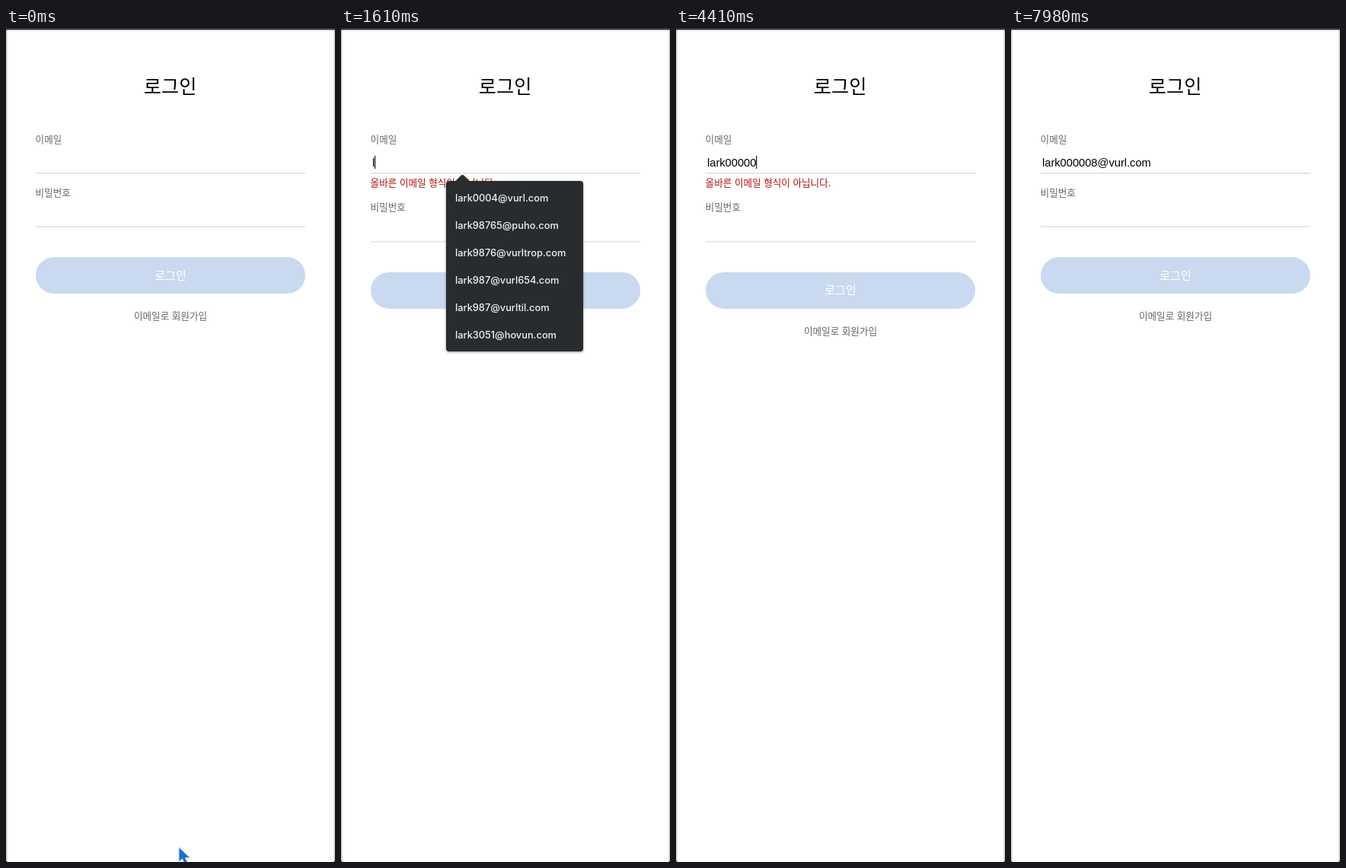
Recreate the animation shown at these times as an HTML page. Size 432x1096 px, loop 8000 ms.

```html
<!DOCTYPE html>
<html lang="ko">
<head>
<meta charset="utf-8">
<title>로그인</title>
<style>
  html, body { margin: 0; width: 100%; height: 100%; overflow: hidden; background: #fff; }
  svg { display: block; width: 432px; height: 1096px; }
  text { font: 500 12.6px "Noto Sans CJK KR", "Noto Sans KR", "Noto Sans CJK", sans-serif; fill: #666; white-space: pre; }
  .mid { text-anchor: middle; }
  #title { font-size: 25.2px; fill: #000; }
  #submit { font-size: 15px; fill: #fff; }
  #error { fill: #b01010; font-weight: 400; }
  #email { font: 14.667px "Liberation Sans", Arial, sans-serif; fill: #000; }
  #popup { fill: #282c2f; filter: drop-shadow(0 1px 1.5px rgba(0, 0, 0, .45)); }
  #popup text { font: 500 12.8px Inter, Roboto, sans-serif; fill: #f1f3f4; }
  .line { fill: #dadada; }
</style>
</head>
<body>
<svg viewBox="0 0 432 1096">
  <rect width="432" height="1096" fill="#fff"/>
  <path d="M.75 0V1096M431.25 0V1096" stroke="#c4c4c4" stroke-width="1.5"/>
  <rect width="432" height="2.5" fill="#353336"/>
  <path d="M0 1094v2h2zM432 1094v2h-2z" fill="#444"/>

  <text id="title" class="mid" x="215.6" y="86.2">로그인</text>
  <text x="38.6" y="151.2">이메일</text>
  <rect class="line" x="39" y="190.2" width="354" height="1.3"/>
  <text id="email" x="41" y="181.6"></text>
  <text id="error" x="38.6" y="208.2">올바른 이메일 형식이 아닙니다.</text>

  <g id="lower">
    <text x="38.6" y="220.7">비밀번호</text>
    <rect class="line" x="39" y="260.4" width="354" height="1.2"/>
    <rect x="39" y="301.1" width="354" height="48" rx="24" fill="#c9d9ef"/>
    <text id="submit" class="mid" x="216" y="330.6">로그인</text>
    <text class="mid" x="216" y="383.2">이메일로 회원가입</text>
  </g>

  <rect id="caret" width="1.1" height="17" fill="#000"/>

  <g id="popup">
    <path d="M149.5 202L157.5 194Q159.5 192 161.5 194L169.5 202Z"/>
    <rect id="panel" x="138" y="201" rx="4"/>
    <g id="rows"></g>
  </g>

  <g id="arrow">
    <path d="M0 0V17.5L4.2 13.8 7.2 20.5 10.3 19.1 7.4 12.6H13Z" fill="#1a6fd0" stroke="#dfe6ee" stroke-width="3.2" stroke-linejoin="round" paint-order="stroke"/>
  </g>
  <g id="beam" fill="none" stroke-linecap="round">
    <path id="stem" d="M-4-10Q-1-10 0-8Q1-10 4-10M0-8V8M-4 10Q-1 10 0 8Q1 10 4 10M-1.5 1H1.5" stroke="#b5daf7" stroke-width="4.4"/>
    <use href="#stem" style="display:none"/>
    <path d="M-4-10Q-1-10 0-8Q1-10 4-10M0-8V8M-4 10Q-1 10 0 8Q1 10 4 10M-1.5 1H1.5" stroke="#234a70" stroke-width="1.5"/>
  </g>
</svg>
<script>
const $ = id => document.getElementById(id);
const LOOP = 8000;
const ADDRESS = 'lark000008@vurl.com';
const HINTS = ['lark0004@vurl.com', 'lark98765@puho.com', 'lark9876@vurltrop.com',
  'lark987@vurl654.com', 'lark987@vurltil.com', 'lark3051@hovun.com'];

// One key press per character of the address
const KEYS = [1610, 2030, 2240, 2520, 2800, 3010, 3290, 3990, 4410, 4550,
  5040, 5950, 6090, 6230, 6440, 6720, 6790, 7000, 7140];
const FOCUS = 1120, TAB = 7420;
const BLINKS = [[3780, 3990], [5600, 5950], [7980, LOOP]];
const ERROR = [1610, 6790];
const POPUP = [1540, 3990], NARROW = 2800;
const SHIFT = 19.8;

// time, x, y of the pointer
const POINTER = [[0, 227.5, 1077.5], [70, 246, 960], [140, 293, 610], [210, 248, 318],
  [280, 208.5, 186.5], [560, 210, 182], [630, 211, 178], [700, 211, 175.5]];
const BEAM_FROM = 560, POINTER_END = 1540;

const within = (t, [from, to]) => t >= from && t < to;
const show = (id, on) => $(id).setAttribute('visibility', on ? 'visible' : 'hidden');
const set = (id, attrs) => {
  for (const key in attrs) $(id).setAttribute(key, attrs[key]);
};

const rows = HINTS.map((hint, i) => {
  const row = document.createElementNS('http://www.w3.org/2000/svg', 'text');
  row.textContent = hint;
  row.setAttribute('x', 150);
  row.setAttribute('y', 228.2 + 36 * i);
  return $('rows').appendChild(row);
});

function drawField(t) {
  const typed = KEYS.filter(key => key <= t).length;
  $('email').textContent = ADDRESS.slice(0, typed);
  const inPassword = t >= TAB;
  const width = typed && !inPassword ? $('email').getComputedTextLength() : 0;
  set('caret', { x: 40.8 + width, y: inPassword ? 238 : 168 });
  show('caret', t >= FOCUS && !BLINKS.some(span => within(t, span)));

  const invalid = within(t, ERROR);
  show('error', invalid);
  set('lower', { transform: `translate(0 ${invalid ? SHIFT : 0})` });
}

function drawPopup(t) {
  const narrow = t >= NARROW;
  show('popup', within(t, POPUP));
  set('panel', { width: narrow ? 156 : 180, height: narrow ? 44 : 224 });
  rows.forEach((row, i) => { row.style.display = narrow && i ? 'none' : ''; });
}

function drawPointer(t) {
  const [, x, y] = POINTER.filter(point => point[0] <= t).pop();
  const beam = t >= BEAM_FROM;
  const visible = t < POINTER_END;
  for (const id of ['arrow', 'beam']) set(id, { transform: `translate(${x} ${y})` });
  show('arrow', visible && !beam);
  show('beam', visible && beam);
}

const start = performance.now();
function frame() {
  const t = (performance.now() - start) % LOOP;
  drawField(t);
  drawPopup(t);
  drawPointer(t);
  requestAnimationFrame(frame);
}
frame();
</script>
</body>
</html>
```
